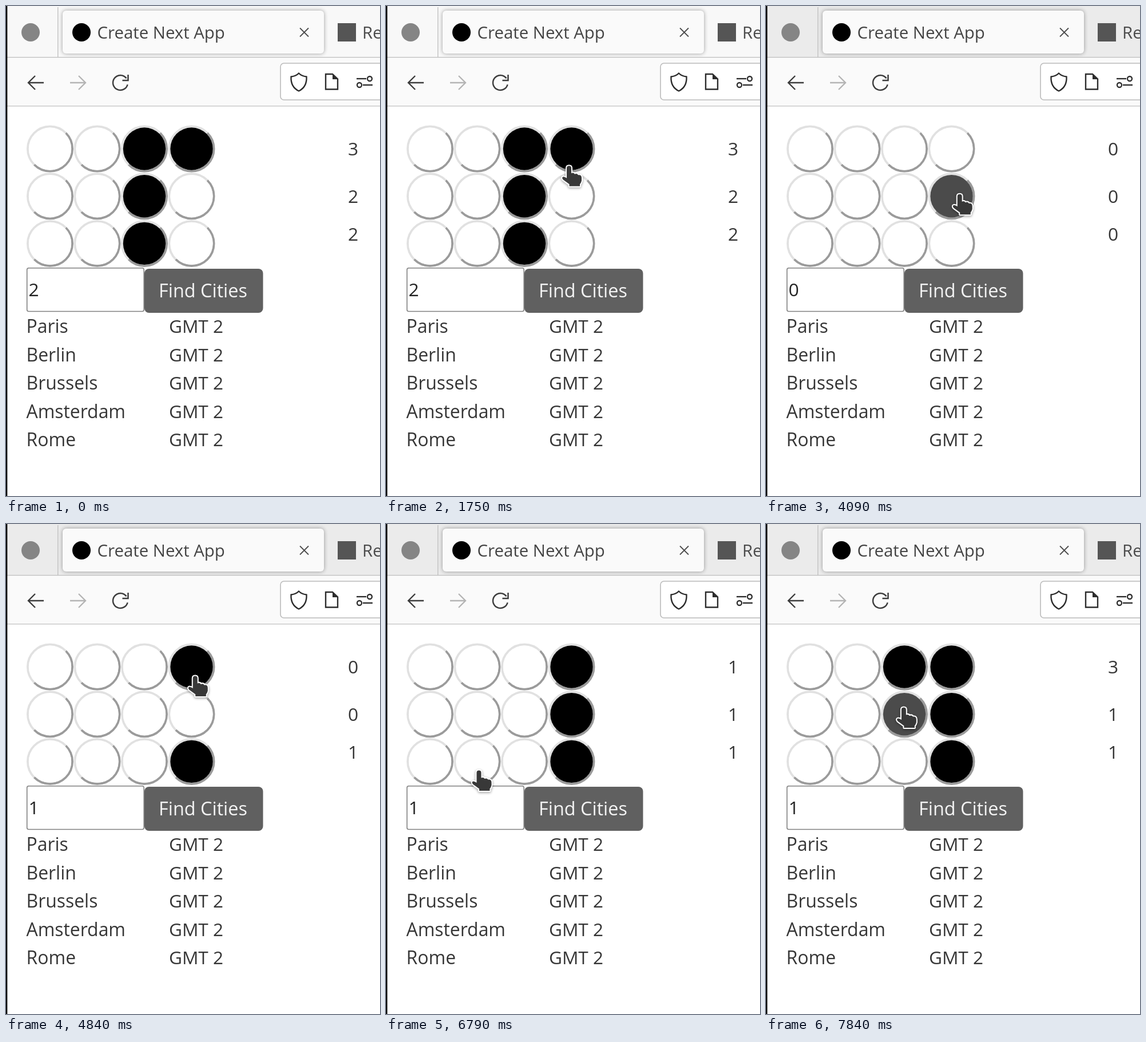
Write an HTML page with a canvas that moves like this. It is 654 by 856 pixels and loops after 8000 ms.

```html
<!DOCTYPE html>
<html lang="en">
<head>
<meta charset="utf-8">
<title>Binary clock cities</title>
<style>
html, body { margin: 0; width: 100%; height: 100%; overflow: hidden; background: #fff; }
canvas { display: block; width: 654px; height: 856px; }
</style>
</head>
<body>
<canvas id="stage" width="654" height="856"></canvas>
<script>
const ctx = document.getElementById('stage').getContext('2d');
const LOOP = 8000;
const HOVER_LAG = 120;
const COUNT_LAG = 180;
const FONT = '"Open Sans", "Noto Sans", sans-serif';
const INK = '#363636';
const CITIES = ['Paris', 'Berlin', 'Brussels', 'Amsterdam', 'Rome'];
const START = [3, 2, 2];

// The pointer's itinerary, measured in grid cells
const rest = (at, col, row) => ({ at, col, row });
const click = (at, col, row) => ({ at, col: col + 0.07, row: row + 0.15, cell: [row, col] });
const STOPS = [
  rest(500, 6.5, 2.95), rest(1290, 3.05, 1.1), rest(1700, 2.94, 0.36),
  click(2210, 3, 0), click(3000, 2, 0), click(3340, 2, 1), click(3640, 2, 2),
  rest(3880, 3.17, 0.91),
  click(4420, 3, 2), click(4800, 3, 0), click(5130, 3, 1),
  rest(5670, 3.31, 1.16), rest(6170, 2.5, 4.1), rest(6420, 0.2, 3.9),
  rest(6790, 1.03, 2.19), rest(7020, 1.3, 0.73),
  click(7380, 2, 0), rest(7840, 1.98, 0.86)
];
const CLICKS = STOPS.filter(stop => stop.cell);
const FOCUS_AT = CLICKS[0].at;

const cellX = col => 77 + col * 82.5;
const cellY = row => 249.5 + row * 82.7;
const smooth = k => k * k * (3 - 2 * k);
const mix = (a, b, k) => a + (b - a) * k;

// Each move ends at its stop's time and lasts longer for longer ways
function pointerAt(t) {
  if (t < STOPS[0].at) return null;
  const i = STOPS.findIndex(stop => stop.at > t);
  const to = STOPS.at(i);
  const from = i < 0 ? to : STOPS[i - 1];
  const way = Math.hypot(to.col - from.col, to.row - from.row);
  const travel = Math.min(to.at - from.at, 150 + 180 * way);
  const k = i < 0 ? 1 : smooth(Math.max(0, 1 - (to.at - t) / travel));
  return [cellX(mix(from.col, to.col, k)), cellY(mix(from.row, to.row, k))];
}

function rowsAt(t) {
  const rows = [...START];
  for (const { at, cell: [row, col] } of CLICKS) if (t >= at) rows[row] ^= 8 >> col;
  return rows;
}

const inCell = (p, row, col) =>
  p !== null && Math.hypot(p[0] - cellX(col), p[1] - cellY(row)) < 41;

function text(str, x, y, size, color, align = 'left') {
  ctx.font = `${size}px ${FONT}`;
  ctx.fillStyle = color;
  ctx.textAlign = align;
  ctx.fillText(str, x, y);
}

function rect(x, y, w, h, color) {
  ctx.fillStyle = color;
  ctx.fillRect(x, y, w, h);
}

function outline(color, width) {
  ctx.strokeStyle = color;
  ctx.lineWidth = width;
  ctx.stroke();
}

function box(x, y, w, h, r, fill, stroke) {
  ctx.beginPath();
  ctx.roundRect(x, y, w, h, r);
  ctx.fillStyle = fill;
  ctx.fill();
  if (stroke) outline(stroke, 1.6);
}

function arc(x, y, r, color, width, from = 0, to = 2) {
  ctx.beginPath();
  ctx.arc(x, y, r, from * Math.PI, to * Math.PI);
  outline(color, width);
}

function disc(x, y, r, color) {
  ctx.beginPath();
  ctx.arc(x, y, r, 0, Math.PI * 2);
  ctx.fillStyle = color;
  ctx.fill();
}

function line(d, color, width = 2.4) {
  ctx.strokeStyle = color;
  ctx.lineWidth = width;
  ctx.stroke(new Path2D(d));
}

function withShadow(color, blur, dy, draw) {
  ctx.save();
  ctx.shadowColor = color;
  ctx.shadowBlur = blur;
  ctx.shadowOffsetY = dy;
  draw();
  ctx.restore();
}

function drawTabs(focused) {
  rect(0, 0, 654, 90, focused ? '#ebebeb' : '#f8f8f8');
  rect(90, 2, 1.5, 87, '#c4c4c4');
  disc(43, 46, 16, '#858585');
  withShadow('rgba(0,0,0,.38)', 7, 0, () => box(99, 8, 457, 75, 6, '#fafafa'));
  disc(132, 46, 16, '#000');
  text('Create Next App', 159.5, 57, 29.4, '#444');
  line('m514 38.5 15 15m0-15-15 15', '#4c4c4c', 1.8);
  rect(580, 30, 32, 32, '#555');
  text('Re', 623, 57, 29.4, '#4c4c4c');
  rect(0, 89, 654, 1.5, '#bdbdbd');
}

function drawArrow(x, dir, color) {
  line(`M${x} 134h${-27 * dir}m${12 * dir}-12l${-12 * dir} 12l${12 * dir} 12`, color);
}

function drawToolbar() {
  rect(0, 90.5, 654, 84, '#fafafa');
  rect(0, 174, 654, 1.5, '#cacaca');
  drawArrow(66, 1, '#3c3c3c');
  drawArrow(112, -1, '#b4b4b4');
  arc(200, 134, 13, '#3c3c3c', 2.5, 0.08, 1.8);
  line('M213.5 120v10h-10', '#3c3c3c', 2.5);
  box(480, 100, 190, 64, 6, '#fff', '#bbb');
  line('M512 117.5q-5 5-13.500 6q-1 18 13.500 25q14.500-7 13.500-25q-8.500-1-13.500-6z', '#2c2c2c');
  line('M571 119h-12v26.500h21v-18z', '#2c2c2c');
  ctx.fillStyle = '#2c2c2c';
  ctx.fill(new Path2D('M571 119v9h9z'));
  for (const [x, y, dir] of [[636, 127, -1], [618, 138, 1]]) {
    arc(x, y, 4, '#2c2c2c', 2.3);
    line(`M${x + 6 * dir} ${y}h${17 * dir}`, '#2c2c2c', 2.3);
  }
}

function drawCell(row, col, fill) {
  const x = cellX(col), y = cellY(row);
  arc(x, y, 39, '#e1e1e1', 4, 0.75, 1.75);
  arc(x, y, 39, '#9b9b9b', 4, -0.25, 0.75);
  disc(x, y, 37.2, fill);
}

function drawGrid(t) {
  const rows = rowsAt(t);
  const counts = rowsAt(t - COUNT_LAG);
  const late = pointerAt(t - HOVER_LAG);
  for (let row = 0; row < 3; row++) {
    for (let col = 0; col < 4; col++) {
      const on = rows[row] & (8 >> col);
      drawCell(row, col, on ? '#000' : inCell(late, row, col) ? '#4b4b4b' : '#fff');
    }
    const y = Math.min(cellY(row) + 11.5, 410);
    text(counts[row], 607, y, 31.7, INK, 'center');
  }
  return counts[2];
}

function drawForm(value) {
  box(36.7, 457.7, 204.5, 75.8, 3, '#fff', '#808080');
  text(value, 39.5, 507, 31.7, '#222');
  box(242, 459, 207.5, 77, 8, '#606060');
  text('Find Cities', 267, 509, 32.4, '#f3f3f3');
  CITIES.forEach((city, i) => {
    const y = 571 + i * 49.6;
    text(city, 35.5, y, 31.9, INK);
    text('GMT 2', 285, y, 31.5, INK);
  });
}

const HAND = new Path2D('M-3.500 4q0-4 4-4t4 4v9q4-2 6 1.500q4-2 6 1.500q6-1 6 5v5' +
  'q-1 4-3 6v3.500h-18.500v-3.500l-11-8q-3-4 .5-5q3 0 6 2.500z');
const ARROW = new Path2D('M0 0v30l7-6.500l5 11l5-2.500l-4.500-10.500h9.500z');

function drawPointer(p) {
  if (!p) return;
  const [x, y] = p;
  const overButton = x > 242 && x < 449 && y > 459 && y < 536;
  const overGrid = x > 36 && x < 366 && y > 208 && y < 456;
  const shape = overButton || overGrid ? HAND : ARROW;
  ctx.save();
  ctx.translate(x, y);
  ctx.lineJoin = 'round';
  withShadow('rgba(0,0,0,.4)', 4, 1.5, () => {
    ctx.strokeStyle = '#fff';
    ctx.lineWidth = 4;
    ctx.stroke(shape);
  });
  ctx.fillStyle = '#383838';
  ctx.fill(shape);
  ctx.restore();
}

function draw(t) {
  rect(0, 0, 654, 856, '#fff');
  drawTabs(t >= FOCUS_AT);
  drawToolbar();
  drawForm(drawGrid(t));
  rect(0, 0, 2.3, 856, '#000');
  drawPointer(pointerAt(t));
}

const begin = performance.now();
function tick() {
  draw((performance.now() - begin) % LOOP);
  requestAnimationFrame(tick);
}
tick();
</script>
</body>
</html>
```
